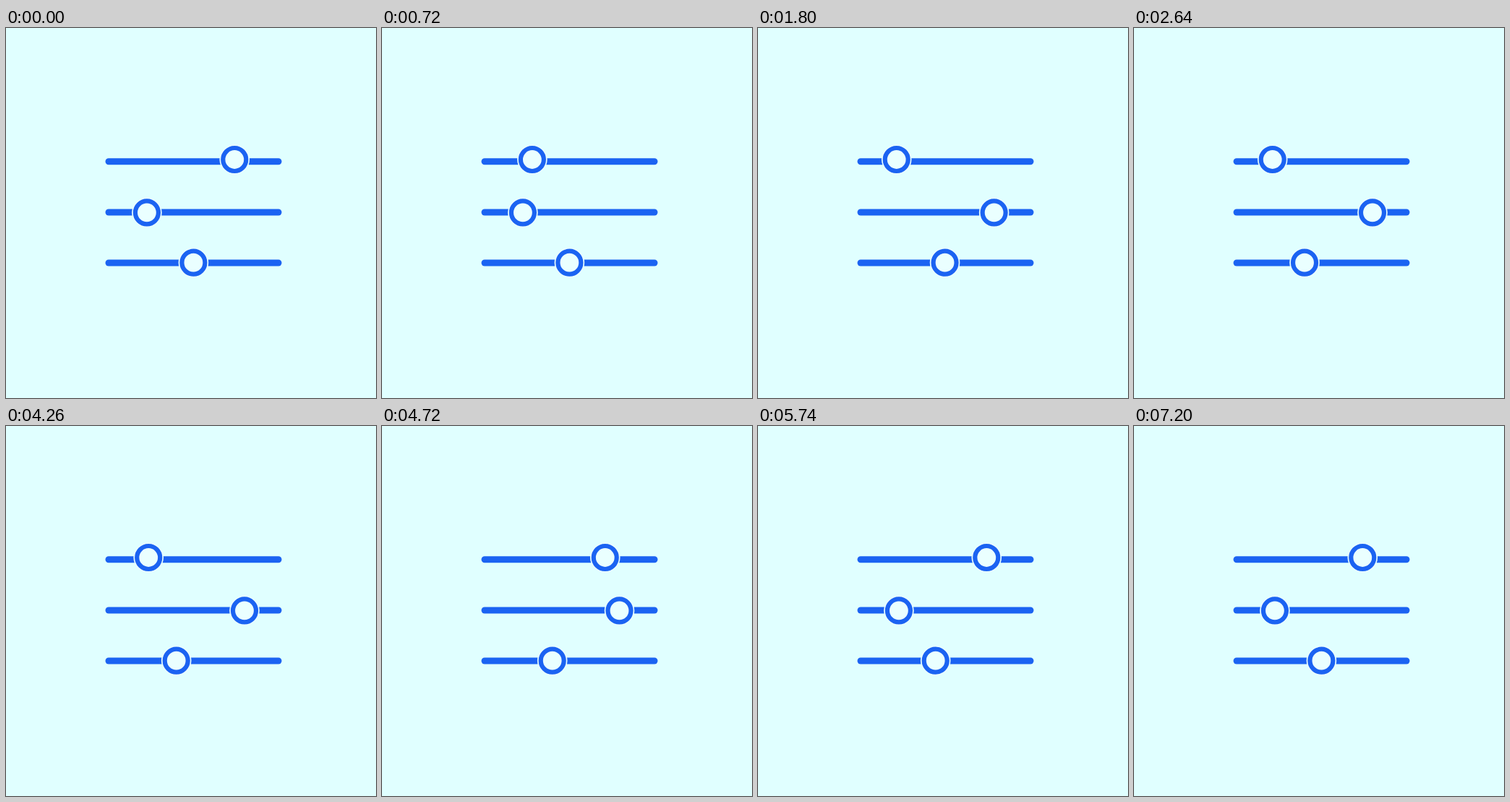
These frames come from a looping animation (512x512 px, 7240 ms). An HTML page:

```html
<!DOCTYPE html>
<html lang="en">
<head>
<meta charset="utf-8">
<title>Sliders</title>
<style>
  html, body { margin: 0; width: 100%; height: 100%; overflow: hidden; background: #e0ffff; }
  svg { display: block; width: 100%; height: 100%; }
  .track { stroke: #1b63f2; stroke-width: 9; stroke-linecap: round; }
  .halo { fill: #eaffff; }
  .ring { fill: #eaffff; stroke: #1b63f2; stroke-width: 6.2; }
</style>
</head>
<body>
<svg viewBox="0 0 512 512">
  <g id="tracks"></g>
  <g id="knobs"></g>
</svg>
<script>
const LOOP = 7240;

// Each curve is a list of [ms since start, progress].
const OUT = [[0, 0], [300, 0.03], [475, 0.137], [540, 0.38], [610, 0.68], [735, 0.89], [950, 0.96], [1190, 0.989], [1320, 1]];
const BACK = [[0, 0], [330, 0.044], [544, 0.42], [597, 0.56], [837, 0.97], [1130, 1]];

const sliders = [
  { line: 184.7, y: 182, home: 316.3, away: 191.7, out: 10, back: 3930 },
  { line: 255, y: 255.4, home: 194.9, away: 330, out: 745, back: 4563 },
  { line: 325, y: 324.7, home: 259.4, away: 235.7, out: 1480, back: 5196 }
];

// Monotone cubic interpolation through the points of a curve.
function makeEase(points) {
  const last = points.length - 1;
  const slope = i => (points[i + 1][1] - points[i][1]) / (points[i + 1][0] - points[i][0]);
  const tangent = points.map((_, i) => {
    if (i === 0 || i === last) return 0;
    const a = slope(i - 1), b = slope(i);
    return 2 * a * b / (a + b);
  });
  return t => {
    if (t <= 0) return 0;
    if (t >= points[last][0]) return 1;
    const i = points.findIndex(p => p[0] > t) - 1;
    const [t0, p0] = points[i], [t1, p1] = points[i + 1];
    const span = t1 - t0, u = (t - t0) / span, v = 1 - u;
    return p0 * v * v * (1 + 2 * u) + p1 * u * u * (3 - 2 * u)
      + span * u * v * (tangent[i] * v - tangent[i + 1] * u);
  };
}

const easeOut = makeEase(OUT);
const easeBack = makeEase(BACK);

function add(parent, tag, attrs) {
  const el = document.createElementNS("http://www.w3.org/2000/svg", tag);
  for (const key in attrs) el.setAttribute(key, attrs[key]);
  return parent.appendChild(el);
}

const tracks = document.getElementById("tracks");
const knobs = document.getElementById("knobs");
for (const s of sliders) {
  add(tracks, "line", { class: "track", x1: 142, x2: 377, y1: s.line, y2: s.line });
  s.knob = add(knobs, "g", {});
  add(s.knob, "circle", { class: "halo", r: 20.8 });
  add(s.knob, "circle", { class: "ring", r: 16 });
}

function draw(t) {
  for (const s of sliders) {
    const p = easeOut(t - s.out) - easeBack(t - s.back);
    const x = s.home + (s.away - s.home) * p;
    s.knob.setAttribute("transform", `translate(${x.toFixed(3)} ${s.y})`);
  }
}

const start = performance.now();
function tick() {
  draw((performance.now() - start) % LOOP);
  requestAnimationFrame(tick);
}
tick();
</script>
</body>
</html>
```
